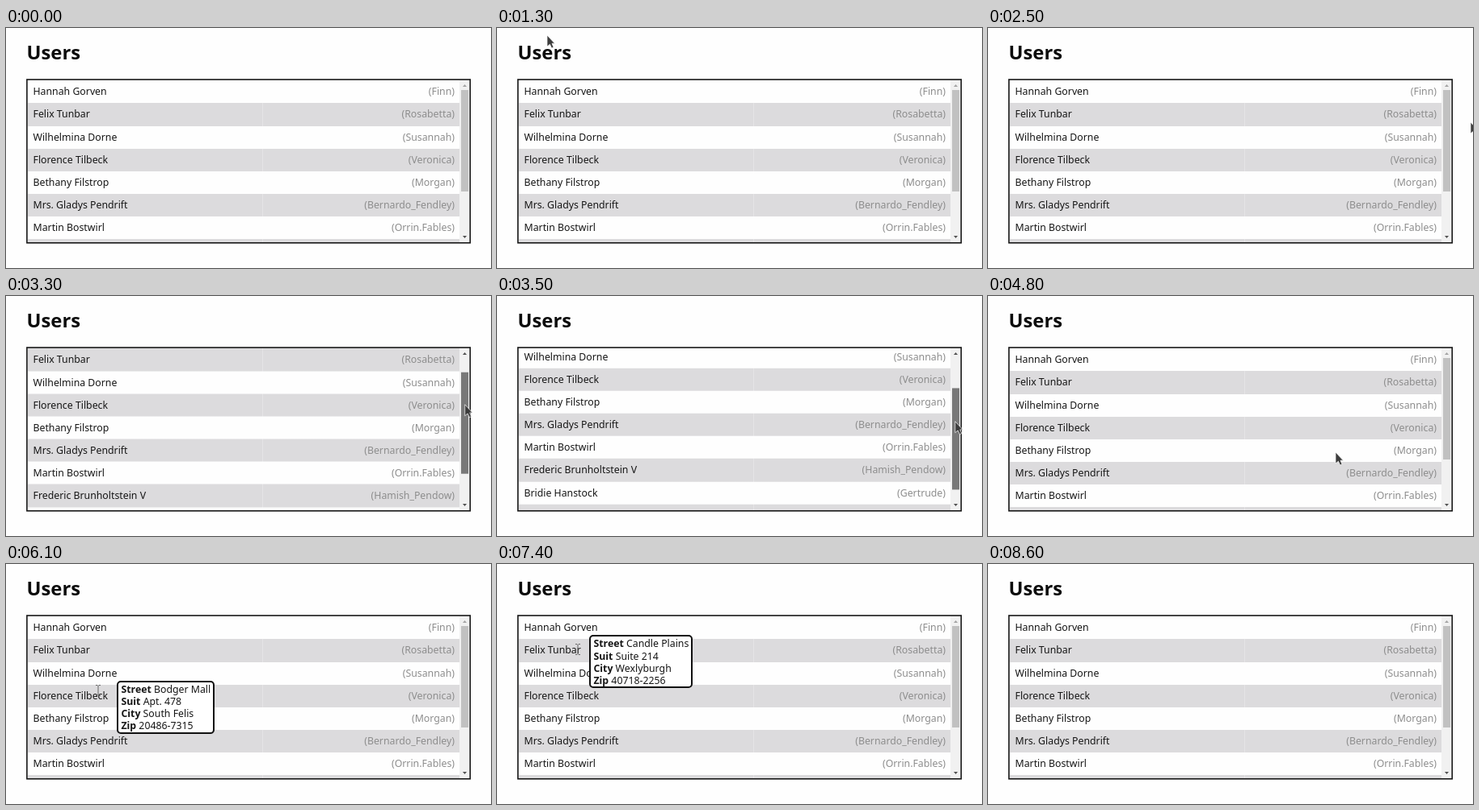
An HTML page that plays this animation: 600 px wide and 298 px high, repeating every 8900 ms.

```html
<!DOCTYPE html>
<html lang="en">
<head>
<meta charset="utf-8">
<title>Users</title>
<style>
  html, body { margin: 0; width: 100%; height: 100%; overflow: hidden; background: #fefefe; }
  body { position: relative; font: 12.3px "Noto Sans", sans-serif; color: #161616; }
  h1 { position: absolute; left: 25.5px; top: 10.4px; margin: 0; font-size: 23.8px; line-height: 40px; color: #0c0c0c; }
  #list { position: absolute; left: 26px; top: 64px; width: 548px; height: 202px; overflow: hidden; }
  #rows { width: 534px; margin: 1.3px 0 0 1px; }
  .row { position: relative; height: 28.17px; line-height: 28.17px; white-space: nowrap; }
  .row:nth-child(even) { background: linear-gradient(90deg, #dcdbdd 290px, #e5e4e6 290px 291px, #dcdbdd 291px); }
  .name { position: absolute; left: 6.5px; }
  .login { position: absolute; right: 6px; color: #8d8d8d; }
  #bar { position: absolute; left: 535px; top: 1px; width: 12px; height: 201px; background: #f1f1f1; }
  #thumb { position: absolute; left: 2px; top: 12px; width: 9px; height: 126px; }
  #tip { position: absolute; border: 2px solid #111; border-radius: 5px; padding: 1px 3px 0 4px; background: #fff; line-height: 15.2px; white-space: nowrap; }
  svg { position: absolute; left: 0; top: 0; overflow: visible; }
</style>
</head>
<body>
<div id="page">
  <h1>Users</h1>
  <div id="list">
    <div id="rows"></div>
    <div id="bar">
      <div id="thumb"></div>
      <svg width="12" height="201">
        <path id="up" d="M4 8 L6.5 5 L9 8Z"/>
        <path d="M4 193 L6.5 196 L9 193Z" fill="#505050"/>
      </svg>
    </div>
  </div>
  <svg width="600" height="298">
    <rect x="25.9" y="64" width="548.3" height="202.8" fill="none" stroke="#161616" stroke-width="1.6"/>
  </svg>
  <div id="tip"></div>
</div>
<svg id="cursor" width="1" height="1">
  <path id="arrow" d="M0 0 V14 L3.4 11.2 L5.6 16 L8 15 L6 10.2 H9.5Z" fill="#3c3c3c" stroke="#fff" stroke-width=".7"/>
  <path id="beam" d="M-3 -6.5 H-1 L0 -5.5 L1 -6.5 H3 M0 -5.5 V5.5 M-3 6.5 H-1 L0 5.5 L1 6.5 H3" fill="none" stroke="#666"/>
</svg>
<script>
const LOOP = 8900, STEP = 100, ROW = 28.17, TOP = 65.3, NAME_LEFT = 33.5;
const DRAG_START = 3100, DRAG_END = 4300, DRAG_REACH = 51, SCROLL_RATIO = 1.61;

// name, login, then street, suite, city and zip where the tooltip is shown
const users = [
  ['Hannah Gorven', 'Finn'],
  ['Felix Tunbar', 'Rosabetta', 'Candle Plains', 'Suite 214', 'Wexlyburgh', '40718-2256'],
  ['Wilhelmina Dorne', 'Susannah', 'Tandle Extension', 'Suite 593', 'McTolliehaven', '61827-3045'],
  ['Florence Tilbeck', 'Veronica', 'Bodger Mall', 'Apt. 478', 'South Felis', '20486-7315'],
  ['Bethany Filstrop', 'Morgan', 'Gorse Walks', 'Suite 608', 'Ardleview', '48150'],
  ['Mrs. Gladys Pendrift', 'Bernardo_Fendley', 'Tobernal Crossing', 'Apt. 317', 'South Milby', '71842-6093'],
  ['Martin Bostwirl', 'Orrin.Fables'],
  ['Frederic Brunholtstein V', 'Hamish_Pendow'],
  ['Bridie Hanstock', 'Gertrude'],
  ['Bernadetta McQuorn', 'Hester.Plunden']
];
const labels = ['Street', 'Suit', 'City', 'Zip'];

// Pointer stops outside the drag: time, x, y
const stops = [
  [1300, 62, 9], [2000, 428, 22], [2400, 620, 30], [2500, 597, 117], [2800, 568, 115],
  [DRAG_END, 557, 115], [4800, 430, 194], [5400, 140, 220], [6100, 114, 157],
  [6700, 100, 106], [7700, 100, 106], [7800, 105, 160], [8500, 105, 160]
];

const el = id => document.getElementById(id);
const show = (node, visible) => { node.style.visibility = visible ? 'visible' : 'hidden'; };
const clamp = u => Math.min(1, Math.max(0, u));
const dragProgress = t => clamp((t - DRAG_START) / (DRAG_END - DRAG_START));
const dragOffset = u => DRAG_REACH * Math.sin(Math.PI * clamp(u) ** 1.218);

function pointerAt(t) {
  if (t >= 2800 && t < DRAG_END) {
    const u = dragProgress(t);
    return [568 - 11 * u * u, 115 + dragOffset(u * 1.1)];
  }
  const next = Math.max(1, stops.findIndex(stop => stop[0] > t));
  const [t0, x0, y0] = stops[next - 1], [t1, x1, y1] = stops[next];
  const k = clamp((t - t0) / (t1 - t0));
  return [x0 + (x1 - x0) * k, y0 + (y1 - y0) * k];
}

el('rows').innerHTML = users.map(([name, login]) =>
  `<div class="row"><span class="name">${name}</span><span class="login">(${login})</span></div>`).join('');
const nameEnds = [...document.querySelectorAll('.name')].map(n => NAME_LEFT + n.offsetWidth);

function hoveredUser(x, y) {
  const i = Math.floor((y - TOP) / ROW);
  const onLine = Math.abs(y - TOP - (i + .5) * ROW) < 9;
  return onLine && x > NAME_LEFT && x < nameEnds[i] ? i : -1;
}

function drawTip(i) {
  const address = i < 0 ? [] : users[i].slice(2);
  show(el('tip'), address.length);
  if (!address.length) return;
  el('tip').innerHTML = address.map((text, n) => `<b>${labels[n]}</b> ${text}`).join('<br>');
  el('tip').style.left = nameEnds[i] + 10 + 'px';
  el('tip').style.top = TOP + i * ROW - 5 + 'px';
}

function draw(t) {
  const [x, y] = pointerAt(t);
  const offset = dragOffset(dragProgress(t));
  const pointing = t >= 1300 && t < 8500;
  const dragging = t >= DRAG_START && t < DRAG_END;
  const overThumb = pointing && x > 562 && x < 573 && y > 77;

  el('page').style.display = t >= 1000 && t < 1200 ? 'none' : '';
  el('rows').style.transform = `translateY(${-offset * SCROLL_RATIO}px)`;
  el('thumb').style.transform = `translateY(${offset}px)`;
  el('thumb').style.background = dragging ? '#787878' : overThumb ? '#a8a8a8' : '#c1c1c1';
  el('up').setAttribute('fill', offset > 1 ? '#505050' : '#a3a3a3');

  const user = pointing ? hoveredUser(x, y) : -1;
  drawTip(user);
  el('cursor').style.transform = `translate(${x}px, ${y}px)`;
  show(el('arrow'), pointing && user < 0);
  show(el('beam'), pointing && user >= 0);
}

const start = performance.now();
let drawn = -1;
function tick() {
  const t = Math.floor((performance.now() - start) % LOOP / STEP) * STEP;
  if (t !== drawn) draw(drawn = t);
  requestAnimationFrame(tick);
}
tick();
</script>
</body>
</html>
```
